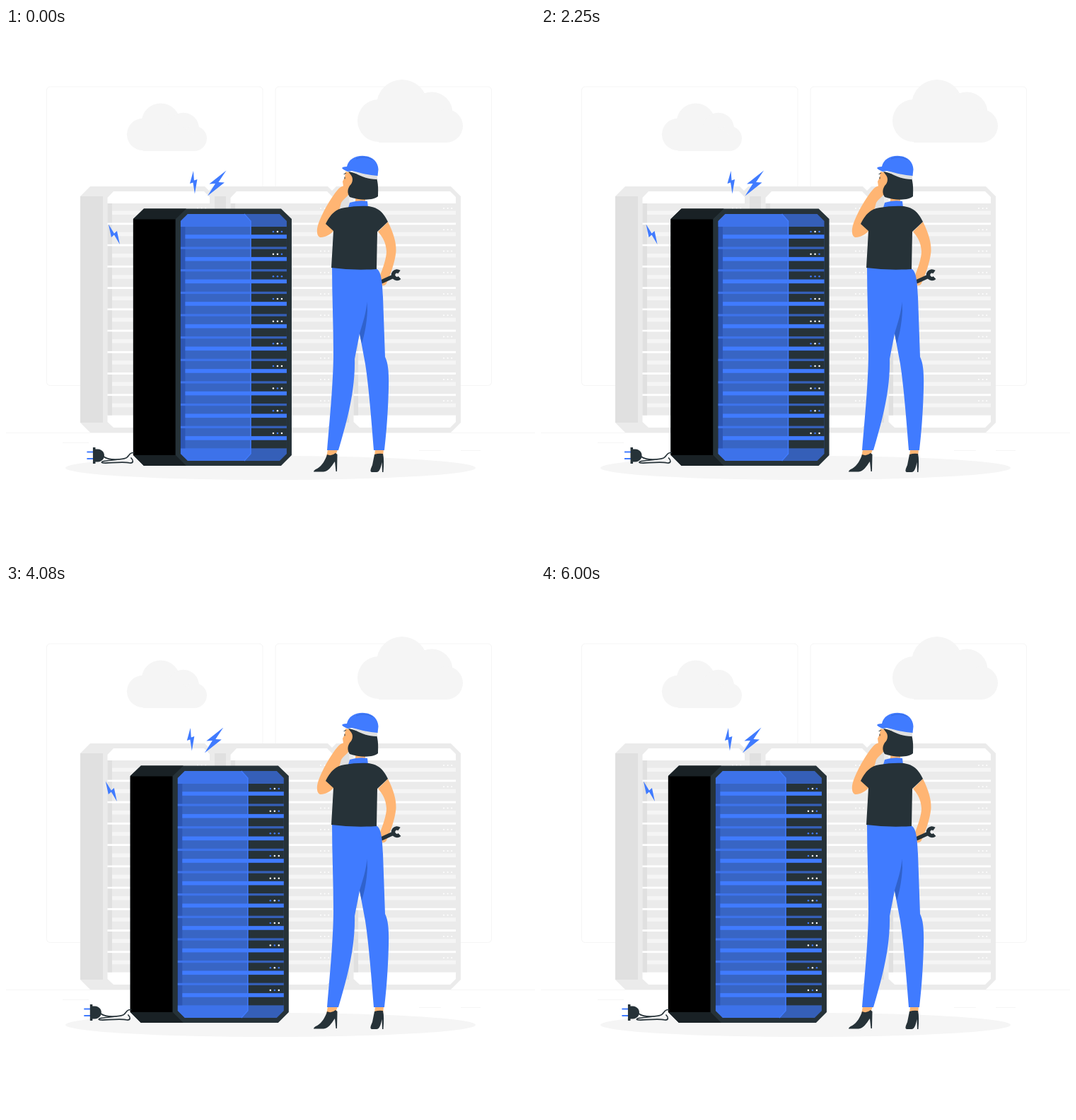
Recreate the animation shown at these times as an HTML page. Size 748 px wide and 748 px high, loop 6.04 s.

```html
<!DOCTYPE html>
<html lang="en">
<head>
<meta charset="utf-8">
<title>Server trouble</title>
<style>
html, body { margin: 0; width: 100%; height: 100%; overflow: hidden; background: #fff; }
svg { display: block; width: 100%; height: 100%; }
.dark { fill: #263238; }
.blue { fill: #407bff; }
.skin { fill: #ffb573; }
.pale { fill: #f5f5f5; }
.line { fill: none; stroke: #263238; stroke-linecap: round; }
</style>
</head>
<body>
<svg viewBox="0 0 748 748">
  <defs>
    <g id="cloud" class="pale">
      <circle cx="30" cy="-31" r="30"/><circle cx="63" cy="-53" r="36"/>
      <circle cx="105" cy="-42" r="29.5"/><circle cx="125.500" cy="-23.500" r="23.500"/>
      <path d="M30-45H105L125-30V0H30Z"/>
    </g>
    <g id="rack">
      <path fill="#ebebeb" d="M105 238 119 224H281L295 238V558L281 572H119L105 558Z"/>
      <path fill="#e0e0e0" d="M105 238H137V558H105Z"/>
      <path fill="#fff" d="M143.500 240 152 231H280L288 239V557L280 565H152L143.500 557Z"/>
      <g id="shelves"></g>
    </g>
  </defs>

  <g fill="none" stroke="#f5f5f5">
    <rect x="57.500" y="83" width="305.500" height="422.500" rx="5"/>
    <rect x="381" y="83" width="305.500" height="422.500" rx="5"/>
    <path d="M0 572.500H748M80 586.500H117M584 597.500H615M643 597.500H671"/>
  </g>
  <use href="#cloud" x="497" y="162"/>
  <use href="#cloud" transform="translate(171 174) scale(.758)"/>
  <use href="#rack" x="348"/>
  <use href="#rack" x="174"/>
  <use href="#rack"/>
  <ellipse class="pale" cx="374" cy="622" rx="290" ry="17"/>

  <g id="server">
    <path class="dark" d="M180 270 195 255.500H389L404 270V604L389 619H195L180 604Z"/>
    <path fill="#192125" d="M180 270 195 255.500H255L240 270V604L255 619H195L180 604Z"/>
    <path d="M180 270.500H239.500V604H180Z"/>
    <path fill="#355fb8" d="M247 273 257 263H387L397 273V602L387 612H257L247 602Z"/>
    <g id="slots"></g>
    <path class="blue" opacity=".7" d="M247 273 257 263H337L346.500 273V602L337 612H257L247 602Z"/>
    <path fill="none" stroke="#407bff" stroke-width="1.500" d="M337 263 346 273V602L337 612"/>
    <g class="blue">
      <path d="M265 202 260 220 264.500 218.500 267 234.500 270.500 214 266 215.500Z"/>
      <path d="M311.500 201.500 287.500 220.500 296 220 285 237.500 309 218.500 300.500 218Z"/>
      <path d="M145 277.500 149 296 153 292.500 161 306 157 287 153 290.500Z"/>
      <path d="M114.500 598.500H124V600.500H114.500ZM114.500 608H124V610H114.500Z"/>
    </g>
    <path class="dark" d="M123 593H126.500V595.500H130C136 596 139 600 139 604.500S136 613 130 613.500H126.500V616H123Z"/>
    <path class="line" stroke-width="1.700" d="M138 606C145 611 158 610.500 167 609 176 607 172 600 181 600.500M170 608C155 612 135 611 135.500 614.500 138 617 163 612 175 615 181 615.500 180 611 177 608"/>
  </g>

  <g id="woman">
    <path class="skin" d="M440 284C442 269 460 239 468 230 474 222 484 220 487 229 487 237 479 239 474 247L463 287C456 295 448 296 444 296 440 294 439.500 289 440 284Z"/>
    <path class="skin" d="M526 288 540 274C548 290 552 303 551.500 316 550 332 543 350 538 361 536 365 532 365 529 363L528 352C533 340 538 325 538 316 537 303 533 296 526 288Z"/>
    <path class="line" stroke-width="5.500" style="stroke-linecap:butt" d="M530.500 359 548 351M556.500 353A5.300 5.300 0 1 1 556 345"/>
    <path class="skin" d="M455 596H469L465 607H453ZM522 596H534L533 606H521Z"/>
    <path class="dark" d="M454 603Q460 606 466 601L468.500 603 468 627H466.500L465 613C460 620 456 627 449 627.500H435Q435 625 440 623C447 619 452 610 454 603Z"/>
    <path class="dark" d="M521 603Q527 601 533 602 535 610 533.500 628H532L531.500 614C530 622 528 628 524 628H517C514 627 516 623 518 618Z"/>
    <path class="blue" d="M461 338 523 340C531 343 532 360 533 380L536 465C541 475 541.500 490 541 510 540 550 537 580 535 597H520C516 545 512 500 508 475L500 432 493 468C494 510 484 550 470 597H454C457 560 463 500 463 460 463 420 461 380 461 338Z"/>
    <path fill="#3062cc" d="M510.500 387 511 400C510 420 506 437 503 446L500 432C504 418 509 405 510.500 387Z"/>
    <path class="skin" d="M494 238H508V247H494Z"/>
    <path class="blue" d="M484 254 486 247Q498 243 511 245L512 254Z"/>
    <path class="dark" d="M479 254C470 255 460 260 452 277L463 287 460 339Q490 343 524 341L525 288 540 274C533 259 525 254 513 252Q496 251 479 254Z"/>
    <path class="skin" d="M480 203 490 205C493 215 490 224 485 235L478 231 476 217 479 211Z"/>
    <path class="dark" d="M484 203C495 205 505 210 524 212 527 222 526 232 526 238 520 244 500 244 486 239 482 233 483 228 486 223 490 220 492 212 487 207Z"/>
    <path class="line" d="M478 206.500 480.500 205.500M479 211V213"/>
    <path fill="#e0e0e0" d="M488 202C500 204 512 207 526 207.500L524 214C510 214 500 209 488 202Z"/>
    <path class="blue" d="M475 198Q476 196 482 196C484 186 493 181 504 180.800 518 181 526 189 526.500 200L525.500 209C510 208 498 204 489 202L483 203C479 201 476 200 475 198Z"/>
    <path fill="none" stroke="#3062cc" opacity=".6" d="M495 185Q506 180 518 186"/>
  </g>
</svg>
<script>
const rect = (x, y, w, h, fill) =>
  `<rect x="${x}" y="${y}" width="${w}" height="${h}" fill="${fill}"/>`;
const dot = (x, y, r, fill) => `<circle cx="${x}" cy="${y}" r="${r}" fill="${fill}"/>`;
const $ = id => document.getElementById(id);

// One string per slot: w is a white light, b a blue one.
const lights = ['bwb', 'wwb', 'bbb', 'bww', 'www', 'bwb', 'bww', 'wbw', 'bwb', 'wbw'];
let shelves = '', slots = '';
lights.forEach((row, i) => {
  const y = 248 + i * 30.25, s = 281 + i * 31.66;
  shelves += rect(143.5, y, 144.5, 27.4, '#ebebeb') + rect(143.5, y, 6.5, 27.4, '#e0e0e0')
    + rect(150, y + 10.5, 138, 5.5, '#f5f5f5');
  slots += rect(247, s, 150, 28.4, '#263238') + rect(247, s, 6.5, 28.4, '#000')
    + rect(253.5, s + 11.2, 143.5, 5.6, '#407bff');
  [...row].forEach((c, k) => {
    shelves += dot(271 + k * 5.6, y + 7, 1, '#fff');
    slots += dot(378 + k * 6, s + 7, 1.25, c === 'w' ? '#fff' : '#407bff');
  });
});
$('shelves').innerHTML = shelves;
$('slots').innerHTML = slots;

const LOOP = 6040, STEP = LOOP / 145, SHAKE = 6000, LEAD = 28, SCALE = 748 / 500;
const shifts = [0, -1, 2, -4, 4, -4, 4, -4, 2, -1, 0];

function shake(t) {
  const p = (t % SHAKE) / SHAKE * 10, i = Math.floor(p);
  return SCALE * (shifts[i] + (shifts[i + 1] - shifts[i]) * (p - i));
}

function draw(now) {
  const t = Math.floor((now % LOOP + 4) / STEP) * STEP;
  $('server').setAttribute('transform', `translate(${shake(t + LEAD).toFixed(3)})`);
  requestAnimationFrame(draw);
}
draw(performance.now());
</script>
</body>
</html>
```
